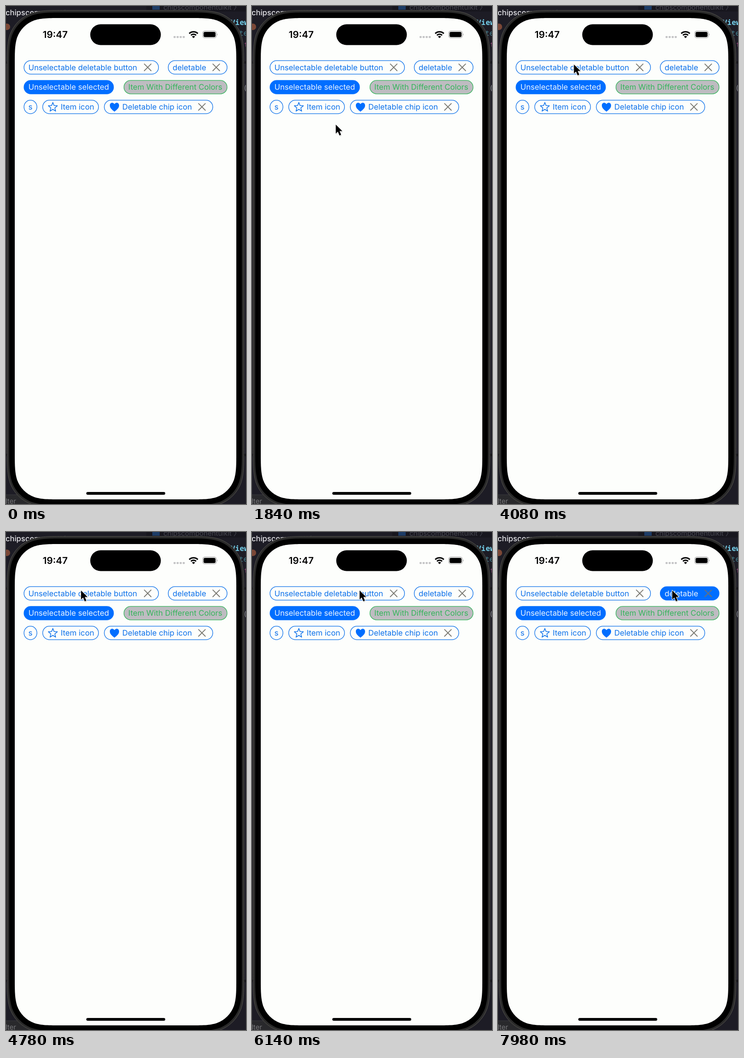
An HTML page for the animation above (8 s loop, 520 by 1077 pixels).

```html
<!DOCTYPE html>
<html lang="en">
<head>
<meta charset="utf-8">
<title>Chips</title>
<style>
  html, body { margin: 0; width: 100%; height: 100%; overflow: hidden; background: #1d1c25; }
  svg { display: block; width: 520px; height: 1077px; }
  text { font-family: Inter, "Noto Sans", sans-serif; text-rendering: geometricPrecision; white-space: pre; }
  .mono { font-family: "Noto Sans Mono", "DejaVu Sans Mono", monospace; }
  .chip { --ink: #0b70ea; --fill: #fdfefc; --line: #0b70ea; --cross: #797871; }
  .chip.on { --ink: #edf4ff; --fill: #006eff; --line: #006eff; --cross: #6a7178; }
  .chip.custom { --ink: #35b45b; --fill: #bebcc1; --line: #35b45b; }
  .chip rect { fill: var(--fill); stroke: var(--line); stroke-width: 1.3; }
  .chip text { fill: var(--ink); font-size: 16.7px; }
  .cross { stroke: var(--cross); stroke-width: 1.8; stroke-linecap: round; fill: none; }
</style>
</head>
<body>
<svg viewBox="0 0 520 1077">
  <!-- editor window behind the phone -->
  <rect width="520" height="1077" fill="#1d1c25"/>
  <rect y="125" width="8" height="843" fill="#232226"/>
  <rect x="512" y="125" width="8" height="843" fill="#201f28"/>
  <path d="M0 122H8M0 971H8M512 122H520M512 971H520" stroke="#131217" stroke-width="5"/>
  <rect x="304" width="216" height="12" fill="#17161e"/>
  <rect y="1057" width="60" height="20" fill="#29292c"/>
  <path d="M0 1057H40" stroke="#3b3b3e"/>
  <text x="-1" y="20" font-size="16.5" font-weight="500" fill="#e4e4e8">chipscomponent</text>
  <circle cx="2" cy="45" r="7" fill="#7b4736"/>
  <rect x="317" y="-8" width="16" height="16" fill="#1d3c66"/>
  <text x="341" y="8" font-size="15" fill="#464650">chipscomponentuikit 〉</text>
  <text class="mono" x="487" y="41" font-size="16" font-weight="700" fill="#74cfea">View</text>
  <text class="mono" x="505" y="64" font-size="16" fill="#44808e">te</text>
  <text class="mono" x="516" y="89" font-size="16" fill="#a04c82">t</text>
  <text class="mono" x="514" y="182" font-size="16" fill="#85858c">(</text>
  <text x="-1" y="1076" font-size="15" fill="#77777a">lter</text>

  <!-- phone -->
  <path id="rim" fill="#292929" stroke="#56554f"/>
  <path id="bezel" fill="#000"/>
  <path id="screen" fill="#fdfefc"/>
  <rect x="182.5" y="39.5" width="153" height="45" rx="22.5"/>
  <rect x="174" y="1051" width="171" height="6" rx="3"/>

  <!-- status bar -->
  <text x="79.5" y="69" font-size="20.6" font-weight="600">19:47</text>
  <g fill="#c4c4c6">
    <rect x="363" y="65" width="4.6" height="4.2" rx="1.4"/>
    <rect x="369.6" y="65" width="4.6" height="4.2" rx="1.4"/>
    <rect x="376.2" y="65" width="4.6" height="4.2" rx="1.4"/>
    <rect x="382.8" y="65" width="4.6" height="4.2" rx="1.4"/>
  </g>
  <g fill="none" stroke="#000" stroke-width="3">
    <path d="M397 59.6A13.4 13.4 0 0 1 415.6 59.6"/>
    <path d="M400.7 63.4A8 8 0 0 1 411.9 63.4"/>
  </g>
  <path d="M406.3 69.5L403 66.2A4.7 4.7 0 0 1 409.6 66.2Z"/>
  <rect x="426.2" y="54.2" width="29.6" height="14.8" rx="4.6" fill="none" stroke="#a0a0a0" stroke-width="1.2"/>
  <rect x="428" y="56" width="26" height="11.2" rx="3"/>
  <path d="M457.3 59.2Q459.6 61.6 457.3 64Z" fill="#a0a0a0"/>

  <g id="chips"></g>

  <g id="cursor" visibility="hidden">
    <path d="M0 0V19.4L4.5 15.3L8 23.4L11.6 21.8L8.2 14H14.2Z" transform="translate(1 2.2)" opacity=".2"/>
    <path d="M0 0V19.4L4.5 15.3L8 23.4L11.6 21.8L8.2 14H14.2Z" stroke="#fff" stroke-width="2" stroke-linejoin="round" paint-order="stroke"/>
  </g>
</svg>
<script>
const LOOP = 8000;
const SELECT_AT = 7300;
const byId = id => document.getElementById(id);

// Rectangle with continuous-curvature corners of nominal radius r.
function smoothRect(x, y, w, h, r) {
  const corner = [[1.528, 0], [1.088, 0], [.868, 0], [.631, .075], [.372, .169],
                  [.169, .372], [.075, .631], [0, .868], [0, 1.088], [0, 1.528]];
  const side = (right, bottom) => {
    const pts = corner.map(([u, v]) => [right ? x + w - u * r : x + u * r, bottom ? y + h - v * r : y + v * r]);
    if (right === bottom) pts.reverse();
    return `${pts[0]}C${pts.slice(1).join(" ")}`;
  };
  return `M${side(0, 0)}L${side(1, 0)}L${side(1, 1)}L${side(0, 1)}Z`;
}
byId("rim").setAttribute("d", smoothRect(2.5, 9.5, 513, 1074, 83));
byId("bezel").setAttribute("d", smoothRect(7, 14, 504, 1065, 79));
byId("screen").setAttribute("d", smoothRect(19, 26, 480, 1041, 67));

const points = (n, at) => Array.from({ length: n }, (_, i) => at(i).map(v => v.toFixed(2)).join()).join(" ");
const starPoints = points(10, i => {
  const r = i % 2 ? 4.5 : 10.4, a = i * Math.PI / 5 - Math.PI / 2;
  return [101.5 + r * Math.cos(a), 219 + r * Math.sin(a)];
});
const star = `<polygon points="${starPoints}" fill="none" stroke="var(--ink)" stroke-width="1.5" stroke-linejoin="round"/>`;
const heart = `<path d="M235 228.4C229 224 225 220 225 215.2C225 208.6 232 207.4 235 212.2C238 207.4 245 208.6 245 215.2C245 220 241 224 235 228.4Z" fill="#006eff"/>`;

const chips = [
  { x: 39, y: 118.2, w: 291.5, label: "Unselectable deletable button", tx: 48.5, cross: 307 },
  { x: 351.5, y: 118.2, w: 127.5, label: "deletable", tx: 361, cross: 455.5, id: "pick" },
  { x: 39, y: 160.9, w: 194, label: "Unselectable selected", tx: 48.5, kind: "on" },
  { x: 255.5, y: 160.9, w: 223.5, label: "Item With Different Colors", tx: 265, kind: "custom" },
  { x: 39, y: 203.7, w: 28, label: "s", tx: 48.5 },
  { x: 79.5, y: 203.7, w: 121, label: "Item icon", tx: 118.5, icon: star },
  { x: 213, y: 203.7, w: 235, label: "Deletable chip icon", tx: 252, cross: 424.5, icon: heart }
];

const crossMark = (x, y) =>
  `<path class="cross" d="M${x - 7.3} ${y - 7.3}L${x + 7.3} ${y + 7.3}M${x + 7.3} ${y - 7.3}L${x - 7.3} ${y + 7.3}"/>`;

byId("chips").innerHTML = chips.map(c => `
  <g class="chip ${c.kind || ""}" ${c.id ? `id="${c.id}"` : ""}>
    <rect x="${c.x}" y="${c.y}" width="${c.w}" height="29.2" rx="14.6"/>
    ${c.icon || ""}
    <text x="${c.tx}" y="${c.y + 20.4}">${c.label}</text>
    ${c.cross ? crossMark(c.cross, c.y + 14.5) : ""}
  </g>`).join("");

// time, x, y of the pointer tip
const track = [
  [1250, -16, 440], [1780, 181.5, 256.5], [1960, 181.5, 256.5], [2800, 166.5, 141.5],
  [3260, 166.5, 141.5], [3700, 164.5, 126.5], [4200, 164.5, 126.5], [4700, 162.5, 126.5],
  [5780, 162.5, 126.5], [6700, 369.5, 126.5], [6900, 369.5, 126.5], [7240, 377.5, 126.5], [LOOP, 377.5, 126.5]
];
const cursor = byId("cursor");
const pick = byId("pick");
const ease = p => p * p * (3 - 2 * p);

function draw(t) {
  pick.classList.toggle("on", t >= SELECT_AT);
  const shown = t >= track[0][0];
  cursor.setAttribute("visibility", shown ? "visible" : "hidden");
  if (!shown) return;
  const i = track.findIndex(k => k[0] > t);
  const [t0, x0, y0] = track[i - 1], [t1, x1, y1] = track[i];
  const p = ease((t - t0) / (t1 - t0));
  cursor.setAttribute("transform", `translate(${x0 + (x1 - x0) * p} ${y0 + (y1 - y0) * p})`);
}

const start = performance.now();
function tick() {
  draw((performance.now() - start) % LOOP);
  requestAnimationFrame(tick);
}
tick();
</script>
</body>
</html>
```
